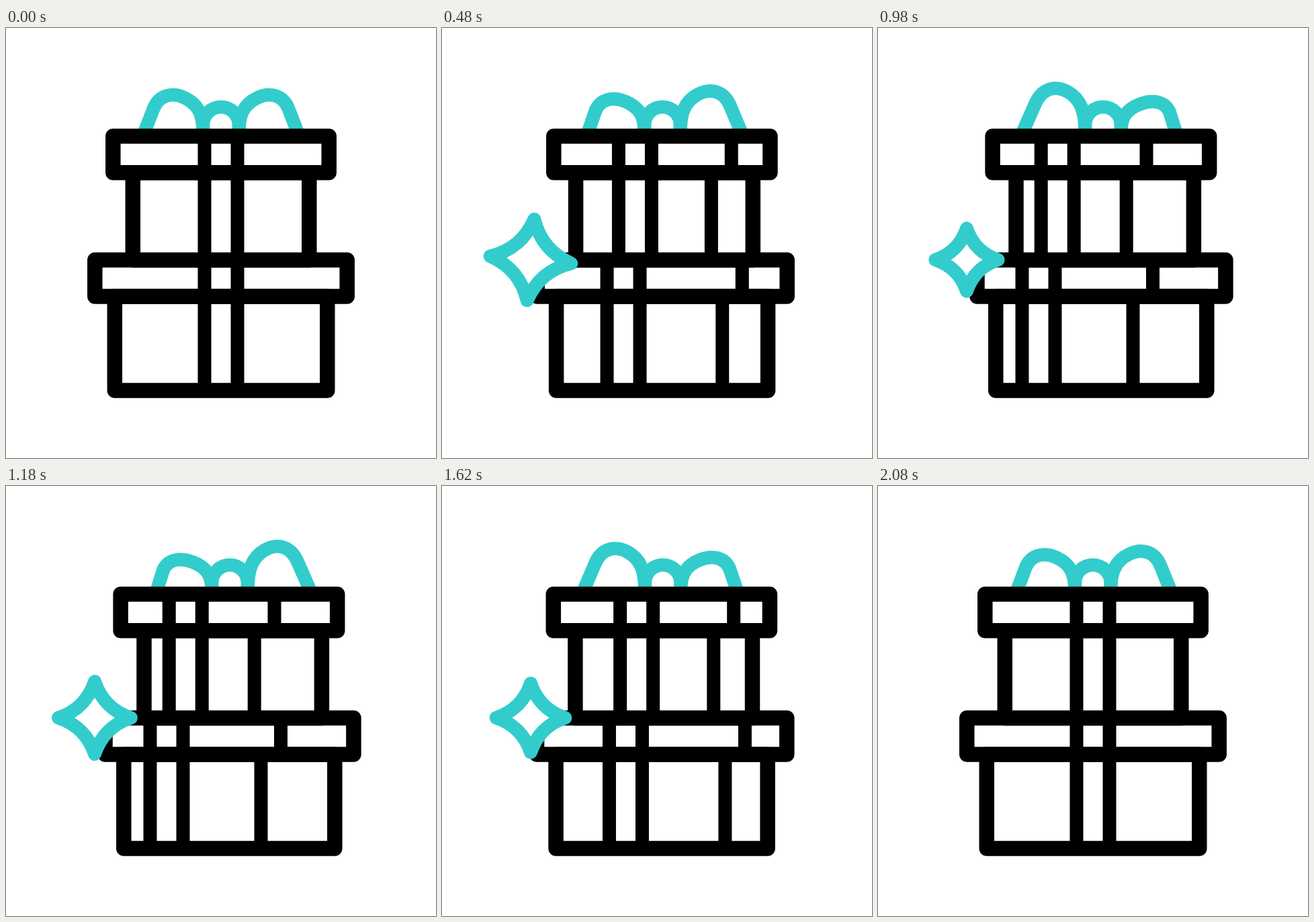
These frames come from a looping animation (640 by 640 pixels, 2.1 s). An HTML page with a canvas:

```html
<!DOCTYPE html>
<html lang="en">
<head>
<meta charset="utf-8">
<title>Gift boxes</title>
<style>
html, body { margin: 0; width: 100%; height: 100%; overflow: hidden; background: #fff; }
canvas { display: block; width: 100vw; height: 100vh; }
</style>
</head>
<body>
<canvas id="stage" width="640" height="640"></canvas>
<script>
const ctx = document.getElementById('stage').getContext('2d');
const LOOP = 2100, TEAL = '#33cccc', INK = '#000';

// keyframes: [time, value]
const TURN = [[260, 0], [642, 1], [1450, 1], [1830, 0]];
const SWAY = [[260, 0], [660, 10], [1008, -10], [1167, 10], [1340, -10], [1500, 10],
  [1665, -10], [2000, 10], [2120, 0]];
const STAR_SIZE = [[0, 0], [380, 63], [830, 44], [870, 44], [1200, 54], [1390, 44], [1740, 54], [1960, 0]];
const STAR_TILT = [[0, 0], [267, -20], [633, 20], [900, 0]];
const HEAD = [[230, 0], [340, 1]];
const TAIL = [[340, 0], [450, 1]];

function track(keys, t) {
  if (t <= keys[0][0]) return keys[0][1];
  for (let i = 1; i < keys.length; i++) {
    const [t1, v1] = keys[i];
    if (t < t1) {
      const [t0, v0] = keys[i - 1];
      const u = (t - t0) / (t1 - t0);
      return v0 + (v1 - v0) * u * u * (3 - 2 * u);
    }
  }
  return keys[keys.length - 1][1];
}

function pen(color, width, cap = 'butt') {
  ctx.strokeStyle = color;
  ctx.lineWidth = width;
  ctx.lineCap = cap;
  ctx.lineJoin = 'round';
}

function frame(left, right, top, bottom) {
  pen(INK, 22.5);
  ctx.strokeRect(left, top, right - left, bottom - top);
}

function bar(x, top, bottom) {
  ctx.fillStyle = INK;
  ctx.fillRect(x - 10, top, 20, bottom - top);
}

function drawBox(q, left, right, top, bottom, ribbonShift, edge, edgeShift) {
  frame(left, right, top, bottom);
  bar(295.5 + ribbonShift * q, top, bottom);
  bar(344.5 + ribbonShift * q, top, bottom);
  bar(edge + edgeShift * q, top, bottom);
}

function drawBoxes(q) {
  drawBox(q, 161.8 + 13.5 * q, 478.3 + 11 * q, 399.5, 539.5, -81, 478, -98.5);
  drawBox(q, 188.8 + 16.7 * q, 451.3 + 18.6 * q, 215.3, 345.3, -52.8, 451, -81.3);
  drawBox(q, 132.3 + 15.2 * q, 507.7 + 9.7 * q, 345.3, 399.5, -81, 507.5, -98.5);
  drawBox(q, 159.3 + 11.3 * q, 480.7 + 12.5 * q, 161, 215.3, -52.8, 481, -81.5);
}

// side -1 is the left loop, 1 the right one
function drawLoop(side, sway, cx) {
  const grow = 1 + side * sway / 51;
  const p = (dx, y, lean) => [cx + side * dx + lean * sway, 152 - (152 - y) * grow];
  ctx.beginPath();
  ctx.moveTo(...p(114, 155, 0.5));
  ctx.lineTo(...p(100, 119, 0));
  ctx.bezierCurveTo(...p(92, 100, -0.2), ...p(73, 95, -0.25), ...p(54, 104, -0.25));
  ctx.bezierCurveTo(...p(35, 113, -0.2), ...p(26, 128, -0.1), ...p(27, 155, -0.1));
  ctx.stroke();
}

function drawBow(q, sway) {
  const cx = 320 + 14 * q;
  pen(TEAL, 20);
  drawLoop(-1, sway, cx);
  drawLoop(1, sway, cx);
  const mid = cx - 0.1 * sway;
  ctx.beginPath();
  ctx.moveTo(mid - 26.5, 156);
  ctx.lineTo(mid - 26.5, 144);
  ctx.arc(mid, 144, 26.5, Math.PI, 0);
  ctx.lineTo(mid + 26.5, 156);
  ctx.stroke();
}

function drawStar(r, tilt) {
  if (r < 1) return;
  const c = r * 0.25;
  ctx.save();
  ctx.translate(132, 345);
  ctx.rotate(tilt * Math.PI / 180);
  ctx.beginPath();
  ctx.moveTo(0, -r);
  ctx.quadraticCurveTo(c, -c, r, 0);
  ctx.quadraticCurveTo(c, c, 0, r);
  ctx.quadraticCurveTo(-c, c, -r, 0);
  ctx.quadraticCurveTo(-c, -c, 0, -r);
  ctx.closePath();
  ctx.fillStyle = '#fff';
  ctx.fill();
  pen(TEAL, Math.min(20, r));
  ctx.stroke();
  ctx.restore();
}

function drawSwoosh(a, b, x0, y0, x1, y1, x2, y2) {
  if (b - a < 0.01) return;
  pen(TEAL, 20, 'round');
  ctx.beginPath();
  for (let i = 0; i <= 24; i++) {
    const u = a + (b - a) * i / 24, v = 1 - u;
    ctx.lineTo(v * v * x0 + 2 * u * v * x1 + u * u * x2, v * v * y0 + 2 * u * v * y1 + u * u * y2);
  }
  ctx.stroke();
}

function draw(t) {
  const q = track(TURN, t), a = track(TAIL, t), b = track(HEAD, t);
  ctx.fillStyle = '#fff';
  ctx.fillRect(0, 0, 640, 640);
  drawBow(q, track(SWAY, t));
  drawBoxes(q);
  drawSwoosh(a, b, 512, 287, 470, 319, 404, 318);
  drawSwoosh(a, b, 499, 347, 455, 374, 380, 374);
  drawStar(track(STAR_SIZE, t), track(STAR_TILT, t));
}

const start = performance.now();
function tick() {
  draw((performance.now() - start) % LOOP);
  requestAnimationFrame(tick);
}
tick();
</script>
</body>
</html>
```
